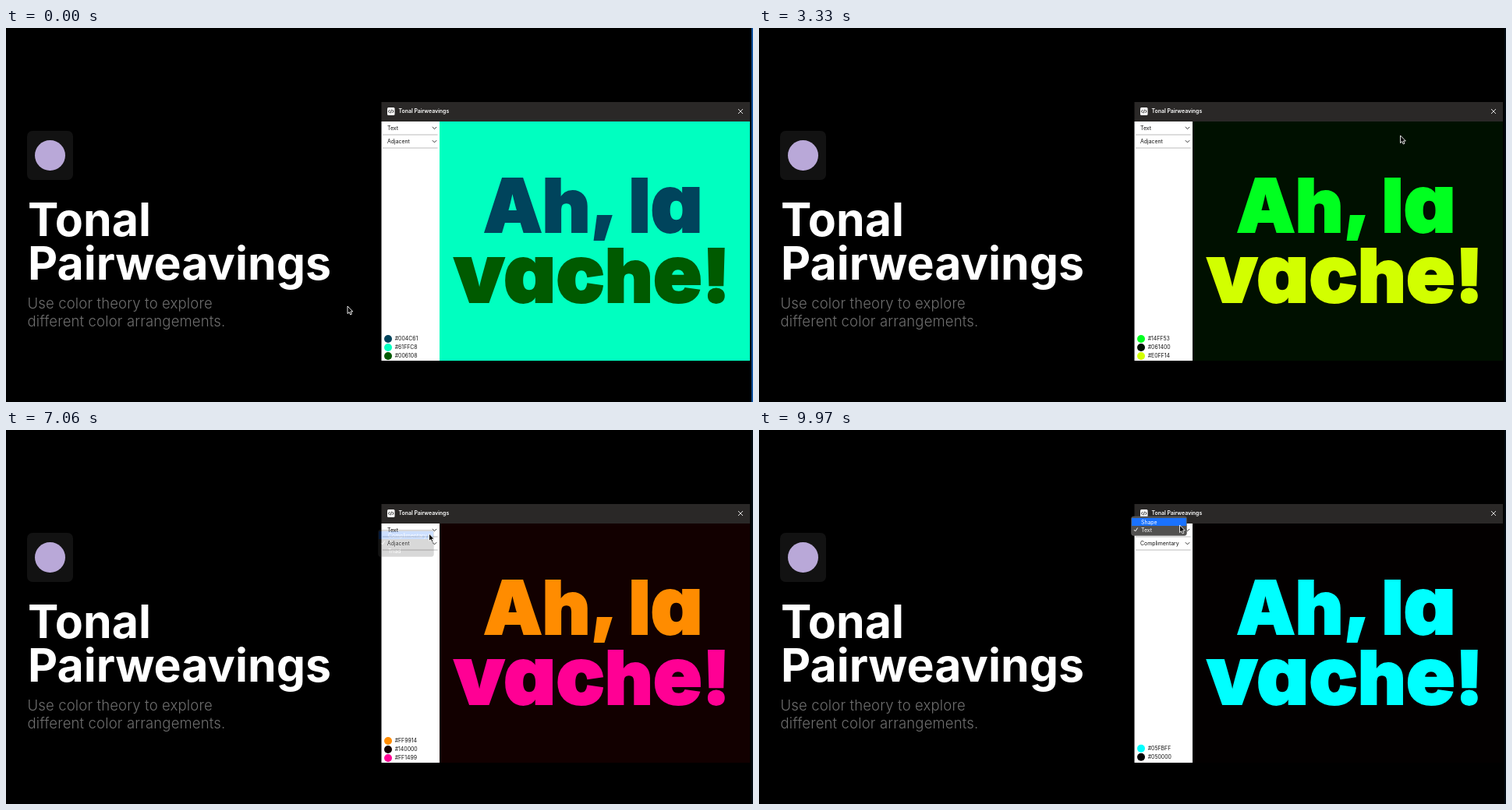
An HTML page that plays this animation: 958 by 480 pixels, repeating every 10 s.

```html
<!DOCTYPE html>
<html lang="en">
<meta charset="utf-8">
<title>Tonal Pairweavings</title>
<style>
  html, body { margin: 0; width: 100%; height: 100%; overflow: hidden; background: #000 }
  svg { display: block; width: 958px; height: 480px; font-family: Inter, sans-serif }
  .title { font-size: 59px; font-weight: 700; fill: #fff }
  .lead { font-size: 18.5px; font-weight: 300; letter-spacing: .15px; fill: #6e6e6e }
  .ui { font-size: 6.9px; fill: #111 }
  .menu { font-size: 6.9px; fill: #fff }
  .sample { font-size: 95px; font-weight: 900; text-anchor: middle; stroke-width: 2; font-feature-settings: "cv11" }
  .sample .low { font-size: 104px }
  .line { fill: none; stroke: #333; stroke-width: 1 }
</style>
<svg viewBox="0 0 958 480">
  <rect width="958" height="480"/>
  <rect id="edge" x="956" width="2" height="480"/>

  <rect x="27" y="132" width="59" height="63" rx="7" fill="#121212"/>
  <circle cx="56.5" cy="163.5" r="19.5" fill="#b9a8d8"/>
  <g class="title"><text x="28" y="267">Tonal</text><text x="28" y="323">Pairweavings</text></g>
  <g class="lead">
    <text x="27.5" y="360">Use color theory to explore</text>
    <text x="27.5" y="383">different color arrangements.</text>
  </g>

  <rect id="stage" x="556" y="120" width="398" height="307"/>
  <text id="top" class="sample" x="753" y="262">Ah<tspan dy="-10">,</tspan><tspan dy="10"> l</tspan><tspan class="low">a</tspan></text>
  <text id="bottom" class="sample" x="751.5" y="352"><tspan class="low">vac</tspan>h<tspan class="low">e</tspan>!</text>

  <rect x="481.5" y="95" width="472.5" height="25" fill="#2a2827"/>
  <rect x="489" y="102" width="9.5" height="10" rx="1.5" fill="#fff"/>
  <path class="line" d="M492 105l-1.5 2 1.5 2M495.5 105l1.5 2-1.5 2M494.3 104.7l-1 4.6"/>
  <text class="ui" x="503.5" y="109.4" style="fill:#fff;font-weight:600">Tonal Pairweavings</text>
  <path class="line" style="stroke:#ddd" d="M939 104l6 6M945 104l-6 6"/>

  <rect x="481.5" y="120" width="74.5" height="307" fill="#fff"/>
  <path class="line" style="stroke:#bbb" d="M483 137h70.5M483 154h70.5"/>
  <path class="line" d="M546.8 127l2.7 2.7 2.7-2.7M546.8 144.2l2.7 2.7 2.7-2.7"/>
  <text class="ui" x="489" y="131">Text</text>
  <text class="ui" id="scheme" x="489" y="148.2"></text>
  <g id="swatches"></g>

  <g id="schemeMenu"></g>
  <g id="kindMenu"></g>
  <path id="cursor" d="M0 0V9.6L2.2 7.6 3.7 11 5.4 10.2 3.9 7H6.8Z" stroke="#fff" stroke-width=".9" stroke-linejoin="round"/>
</svg>
<script>
const LOOP = 10000;
const $ = id => document.getElementById(id);

// start time, scheme, hex labels, colours on screen (top text, stage, bottom text)
const palettes = [
  [0, 'Adjacent', '#004C61 #61FFC8 #006108', '#00445c #00ffc0 #005a00'],
  [970, 'Adjacent', '#14FF53 #061400 #E0FF14', '#00ff20 #001000 #d2ff00'],
  [3450, 'Adjacent', '#A11FFF #01001F #1F9AFF', '#a000ff #000019 #0090ff'],
  [4850, 'Adjacent', '#0FFF73 #020F00 #BBFF0F', '#00ff55 #000b00 #a2ff00'],
  [6000, 'Adjacent', '#FF9914 #140000 #FF1499', '#ff8c00 #120000 #ff0094'],
  [7120, 'Complimentary', '#FF29C9 #00290A', '#ff00d0 #002200'],
  [8600, 'Complimentary', '#05FBFF #050000', '#00ffff #030000']
];

// time, x, y of the pointer tip
const path = [
  [0, 438, 357], [210, 438, 357], [820, 689, 132], [2800, 689, 132],
  [3350, 823, 138], [4250, 823, 138], [4800, 656.5, 127], [6000, 656.5, 127],
  [6450, 545, 146], [6750, 545, 146], [6950, 542.5, 133], [7150, 542.5, 133],
  [7650, 715.5, 145], [9150, 715.5, 145], [9650, 545, 128], [9800, 545, 128],
  [9960, 539.5, 122], [LOOP, 539.5, 122]
];

function buildMenu(id, y, items, checked) {
  const rows = items.map((item, i) => {
    const base = y + 9.5 + i * 10;
    return `<text x="490" y="${base}">${item}</text>` + (i === checked
      ? `<path d="M481 ${base - 2.5}l1.6 2 3-4.5" fill="none" stroke="#fff"/>` : '');
  }).join('');
  $(id).innerHTML = `<g class="menu">
    <rect x="477.5" y="${y}" width="71" height="${items.length * 10 + 4.5}" rx="3" fill="#525150" stroke="#666" stroke-width=".5"/>
    <rect x="478" y="${y + 2}" width="70" height="10" fill="#1a72ff"/>${rows}</g>`;
}

function showPalette([, scheme, labels, colours]) {
  const [top, stage, bottom = top] = colours.split(' ');
  $('stage').setAttribute('fill', stage);
  for (const [id, colour] of [['top', top], ['bottom', bottom]]) {
    $(id).setAttribute('fill', colour);
    $(id).setAttribute('stroke', colour);
  }
  $('scheme').textContent = scheme;
  const names = labels.split(' '), paints = [top, stage, bottom];
  const first = names.length === 3 ? 399 : 408.7;
  $('swatches').innerHTML = names.map((name, i) => {
    const y = first + i * 11;
    return `<circle cx="490" cy="${y}" r="5" fill="${paints[i]}"/>
      <text class="ui" x="498.7" y="${y + 2.4}">${name}</text>`;
  }).join('');
}

function pointerAt(t) {
  const i = path.findIndex(key => key[0] > t);
  const [t0, x0, y0] = path[i - 1], [t1, x1, y1] = path[i];
  const p = (t - t0) / (t1 - t0), e = p * p * (3 - 2 * p);
  return [x0 + (x1 - x0) * e, y0 + (y1 - y0) * e];
}

buildMenu('schemeMenu', 128, ['Complimentary', 'Adjacent', 'Triad'], 1);
buildMenu('kindMenu', 111, ['Shape', 'Text'], 1);

let current;
function draw(now) {
  const t = now % LOOP;
  const palette = palettes.findLast(p => p[0] <= t);
  if (palette !== current) showPalette(current = palette);
  $('cursor').setAttribute('transform', `translate(${pointerAt(t)})`);
  $('edge').setAttribute('fill', t < 210 ? '#0d4f9c' : '#020a12');
  $('schemeMenu').setAttribute('opacity', t < 6600 ? 0 : Math.min(1, Math.max(0, (7085 - t) / 110)));
  $('kindMenu').setAttribute('opacity', t < 9740 ? 0 : 1);
  requestAnimationFrame(draw);
}
requestAnimationFrame(draw);
</script>
</html>
```
